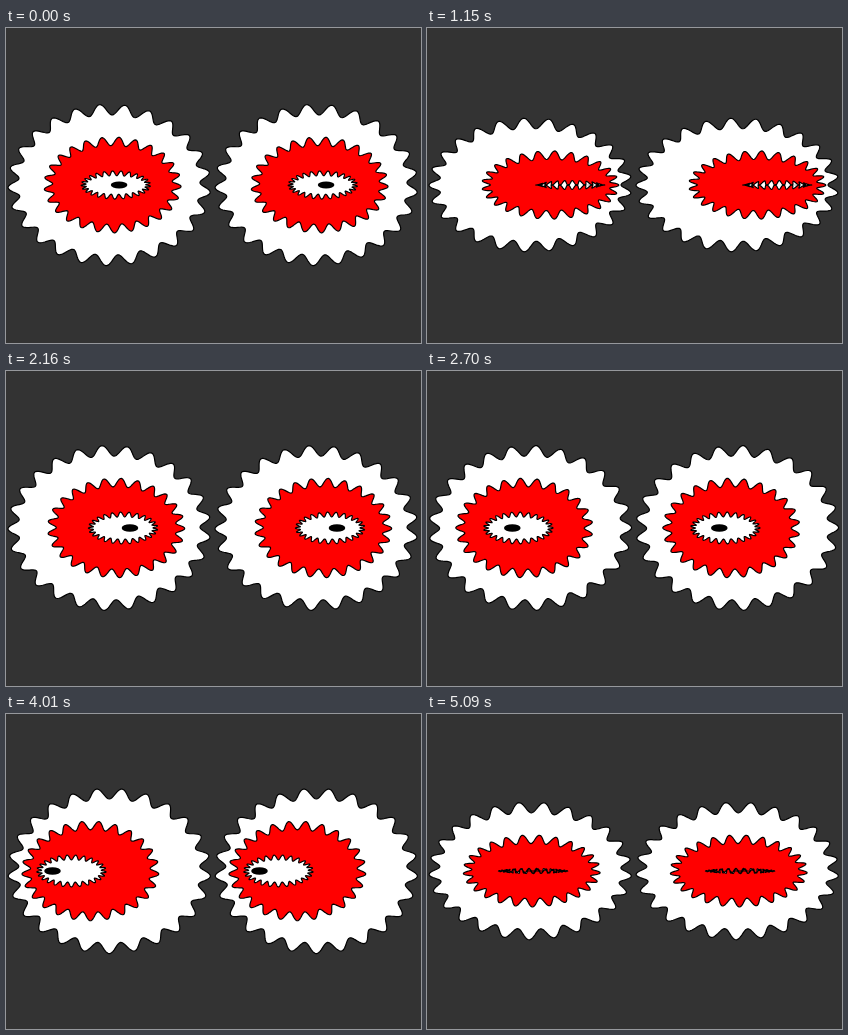
An HTML page with a canvas that plays this animation: 415x315 px, repeating every 5160 ms.

```html
<!DOCTYPE html>
<html lang="en">
<head>
<meta charset="utf-8">
<title>Gear eyes</title>
<style>
html, body { margin: 0; width: 100%; height: 100%; overflow: hidden; background: #333; }
canvas { display: block; }
</style>
</head>
<body>
<canvas id="stage" width="415" height="315"></canvas>
<script>
const ctx = document.getElementById('stage').getContext('2d');
const LOOP = 5160, STEPS = 67, TEETH = 25, TAU = Math.PI * 2;
const BLINK = STEPS / 4, MID_Y = 157;

// Lid drop in pixels against the distance in steps from the widest opening
const LID = [[0, 0], [.38, 1], [.62, 5.3], [2.15, 6.7], [2.6, 12.5],
             [4.6, 18.7], [5.1, 18.8], [6.4, 20.6], [7.4, 32.5], [8.4, 35]];

function lidDrop(step) {
  const phase = (step - 6.4 + BLINK) % BLINK;
  const x = Math.min(phase, BLINK - phase);
  const i = LID.findIndex(([end], k) => k > 0 && x <= end);
  const [x0, y0] = LID[i - 1], [x1, y1] = LID[i];
  return y0 + (y1 - y0) * (x - x0) / (x1 - x0);
}

function gear(cx, radius, depth, turn, drop, fill) {
  ctx.beginPath();
  for (let i = 0; i < 500; i++) {
    const a = i / 500 * TAU;
    const r = radius + depth * Math.cos(TEETH * a - TAU * turn);
    ctx.lineTo(cx + r * Math.sin(a), MID_Y - (r - drop) * Math.cos(a));
  }
  ctx.closePath();
  ctx.fillStyle = fill;
  ctx.fill();
  ctx.stroke();
}

function eye(cx, gaze, turn, drop) {
  gear(cx, 96, 5.3, turn, drop, '#fff');
  gear(cx + gaze, 64.2, 4.3, -turn, drop, '#f00');
  gear(cx + 2 * gaze, 32.3, 2.4, turn, drop, '#fff');
  ctx.beginPath();
  ctx.ellipse(cx + 3 * gaze, MID_Y, 8.3, Math.max(0, 8.3 * (1 - drop / 35)), 0, 0, TAU);
  ctx.fillStyle = '#000';
  ctx.fill();
}

function draw() {
  const time = performance.now() % LOOP;
  const step = Math.floor((time + 14) * STEPS / LOOP) % STEPS;
  const gaze = 20 * Math.cos((step - 15) * TAU / STEPS);
  const turn = .62 + 5 * step / STEPS;
  const drop = lidDrop(step);
  ctx.fillStyle = '#333';
  ctx.fillRect(0, 0, 415, 315);
  ctx.strokeStyle = '#000';
  ctx.lineWidth = 1.2;
  ctx.lineJoin = 'round';
  for (const cx of [103.3, 310.3]) eye(cx, gaze, turn, drop);
  requestAnimationFrame(draw);
}
draw();
</script>
</body>
</html>
```
